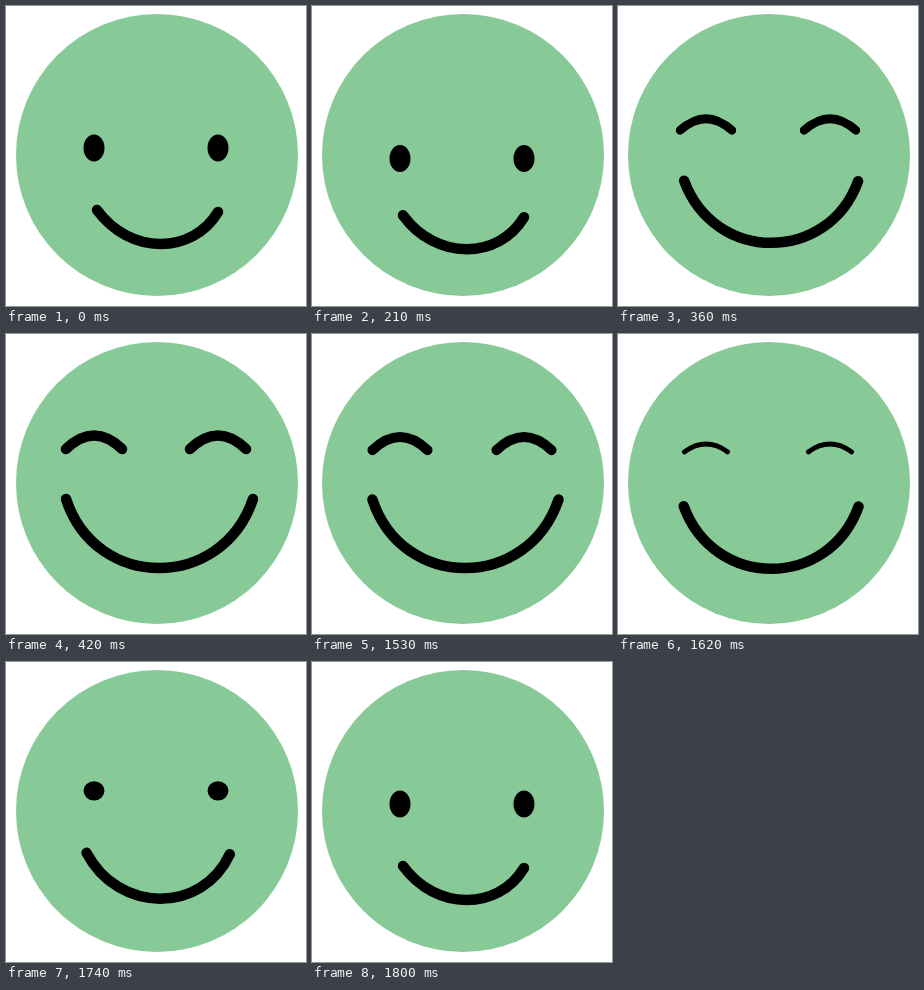
Animation, 300 px wide and 300 px high, one loop 2400 ms. Source, as an HTML page:

```html
<!DOCTYPE html>
<html lang="en">
<head>
<meta charset="utf-8">
<title>Smile</title>
<style>
  html, body { margin: 0; width: 100%; height: 100%; overflow: hidden; background: #fff; }
  svg { display: block; width: 100%; height: 100%; }
  path { fill: none; stroke: #000; stroke-width: 10.5; stroke-linecap: round; }
</style>
</head>
<body>
<svg viewBox="0 0 300 300">
  <circle cx="151" cy="149" r="141" fill="#87ca98"/>
  <g id="dots"><ellipse cx="88" rx="10.5"/><ellipse cx="212" rx="10.5"/></g>
  <path id="arcs"/>
  <path id="mouth"/>
</svg>
<script>
const LOOP = 2400, STEP = 30;
const EYES = [88, 212];
const CALM = [91, 204, 124, 249, 186, 249, 212, 206];
const HAPPY = [60, 165, 90, 257, 216, 257, 247, 165];
const [dots, arcs, mouth] = ['dots', 'arcs', 'mouth'].map(id => document.getElementById(id));

const progress = (t, from, to) => Math.min(1, Math.max(0, (t - from) / (to - from)));
const easeOut = (x, power) => 1 - (1 - x) ** power;
const mix = (a, b, x) => a + (b - a) * x;

function draw(t) {
  const closing = t >= 1500;
  const dip = progress(t, 180, 255);
  const calm = progress(t, 1500, 1800) ** 1.84;
  const smile = closing ? 1 - calm : easeOut(progress(t, 255, 420), 1.6);

  // The face dips before the smile; the eyes dip further than the mouth.
  const eyeDip = closing ? 0 : 16 * easeOut(dip, 2.1);
  const mouthDip = closing ? 0 : 10.4 * easeOut(dip, 1.4) * (1 - smile);
  const eyeY = mix(142 + eyeDip, closing ? 103 : 102, smile);

  const curved = closing ? calm < 0.25 : smile > 0.25;
  dots.style.display = curved ? 'none' : '';
  arcs.style.display = curved ? '' : 'none';

  if (curved) {
    const open = closing ? 1 - 3.2 * calm : smile;
    const half = 28 * mix(0.62, 1, open);
    const rise = 13.5 * mix(0.3, 1, open);
    const endY = eyeY + rise - 0.5 * open;
    arcs.setAttribute('d', EYES.map(x =>
      `M${x - half} ${endY}Q${x} ${endY - 2 * rise} ${x + half} ${endY}`).join(''));
    arcs.style.strokeWidth = 10.5 * mix(0.1, 1, open);
  } else {
    const height = closing ? mix(0.15, 1, calm) : 1 - 3 * smile;
    for (const dot of dots.children) {
      dot.setAttribute('cy', eyeY);
      dot.setAttribute('ry', 13.5 * height);
    }
  }

  const p = CALM.map((v, i) => mix(v, HAPPY[i], smile) + (i % 2) * mouthDip);
  mouth.setAttribute('d', `M${p[0]} ${p[1]}C${p.slice(2).join(' ')}`);
}

const start = performance.now();
function tick() {
  const t = (performance.now() - start) % LOOP;
  draw(Math.floor(t / STEP) * STEP);
  requestAnimationFrame(tick);
}
tick();
</script>
</body>
</html>
```
